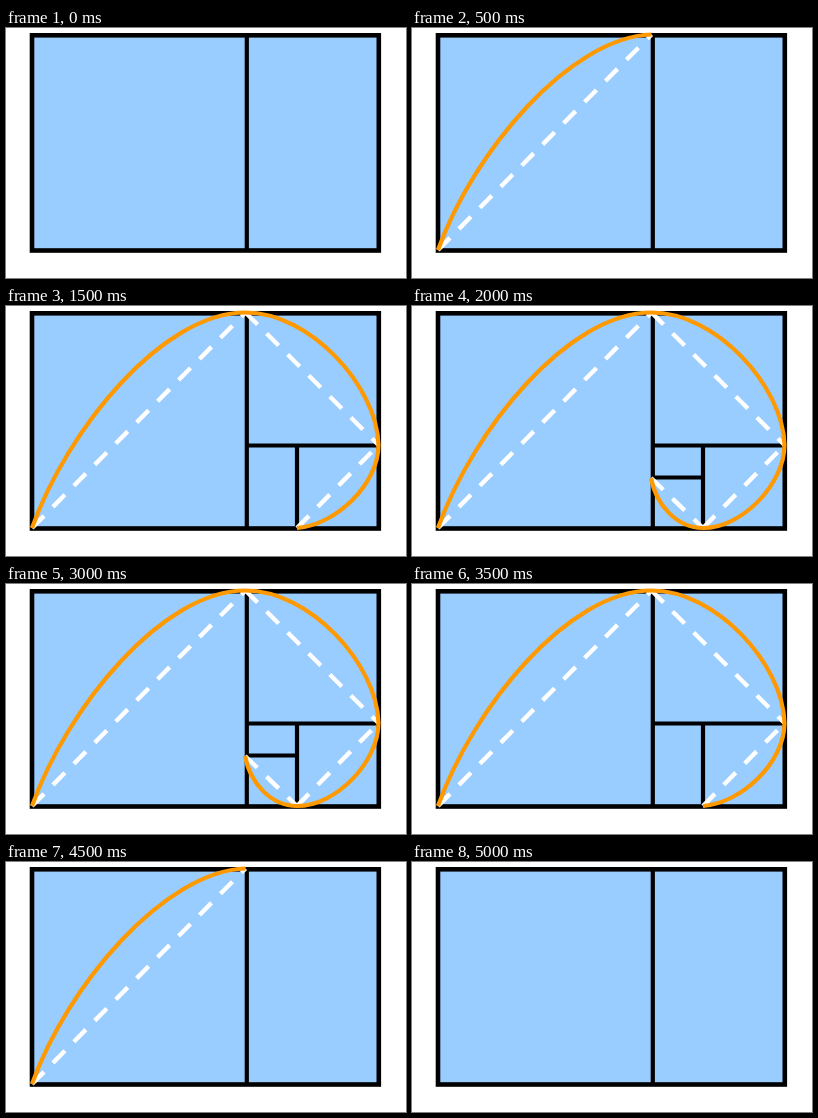
These frames come from a looping animation (400x250 px, 5.5 s). An HTML page:

```html
<!DOCTYPE html>
<html lang="en">
<head>
<meta charset="utf-8">
<title>Golden spiral</title>
<style>
  html, body { margin: 0; width: 100%; height: 100%; overflow: hidden; background: #fff; }
  svg { display: block; width: 400px; height: 250px; }
  path, rect { fill: none; }
  .frame { fill: #9cf; stroke: #000; stroke-width: 4.6; }
  .divider { stroke: #000; stroke-width: 4.2; }
  .chord { stroke: #fff; stroke-width: 4.4; stroke-dasharray: 17 12.75; }
  .spiral { stroke: #f90; stroke-width: 4.2; stroke-linejoin: round; }
</style>
</head>
<body>
<svg viewBox="0 0 400 250">
  <rect class="frame" x="26" y="7.3" width="346.8" height="215.2"/>
  <path class="divider" d="M240.8 7.5V222.5"/>
  <g id="dividers"></g>
  <g id="chords"></g>
  <path id="spiral" class="spiral"/>
</svg>
<script>
const STEP = 500;
const DEPTHS = [0, 1, 2, 3, 4, 5, 4, 3, 2, 1, 0];
const POINTS = [[26, 222], [239.5, 6.5], [372.5, 139], [291, 222], [239, 172], [271, 141]];

// Control points of each arc; "open" is the last control while the arc ends the spiral.
const ARCS = [
  { c1: [61, 124], c2: [156, 6.5], open: [158, 9] },
  { c1: [304, 6.5], c2: [371, 80], open: [358, 66] },
  { c1: [372.5, 178], c2: [330, 222], open: [330, 219] },
  { c1: [265, 222], c2: [239, 200], open: [244, 199] },
  { c1: [239, 154], c2: [253, 141], open: [253, 142] }
];
const DIVIDERS = ["", "M241 139.5H372.5", "M291 139.5V222.5", "M241 171.5H291", "M271 139.5V171.5"];

function addPath(group, className, d) {
  const path = document.createElementNS("http://www.w3.org/2000/svg", "path");
  path.setAttribute("class", className);
  path.setAttribute("d", d);
  document.getElementById(group).append(path);
  return path;
}

// Every chord runs left to right, so its dashes start at the left end.
function chordPath(i) {
  const [left, right] = POINTS.slice(i, i + 2).sort((a, b) => a[0] - b[0]);
  return `M${left}L${right}`;
}

const lines = DIVIDERS.map(d => addPath("dividers", "divider", d));
const chords = ARCS.map((_, i) => addPath("chords", "chord", chordPath(i)));
const spiral = document.getElementById("spiral");

function spiralPath(depth) {
  const arcs = ARCS.slice(0, depth).map((arc, i) => {
    const c2 = i === depth - 1 ? arc.open : arc.c2;
    return `C${arc.c1} ${c2} ${POINTS[i + 1]}`;
  });
  return depth ? `M${POINTS[0]}${arcs.join("")}` : "";
}

let shown = -1;
function draw() {
  const depth = DEPTHS[Math.floor(performance.now() / STEP) % DEPTHS.length];
  if (depth !== shown) {
    shown = depth;
    [lines, chords].forEach(set => set.forEach((path, i) => {
      path.style.display = i < depth ? "" : "none";
    }));
    spiral.setAttribute("d", spiralPath(depth));
  }
  requestAnimationFrame(draw);
}
draw();
</script>
</body>
</html>
```
